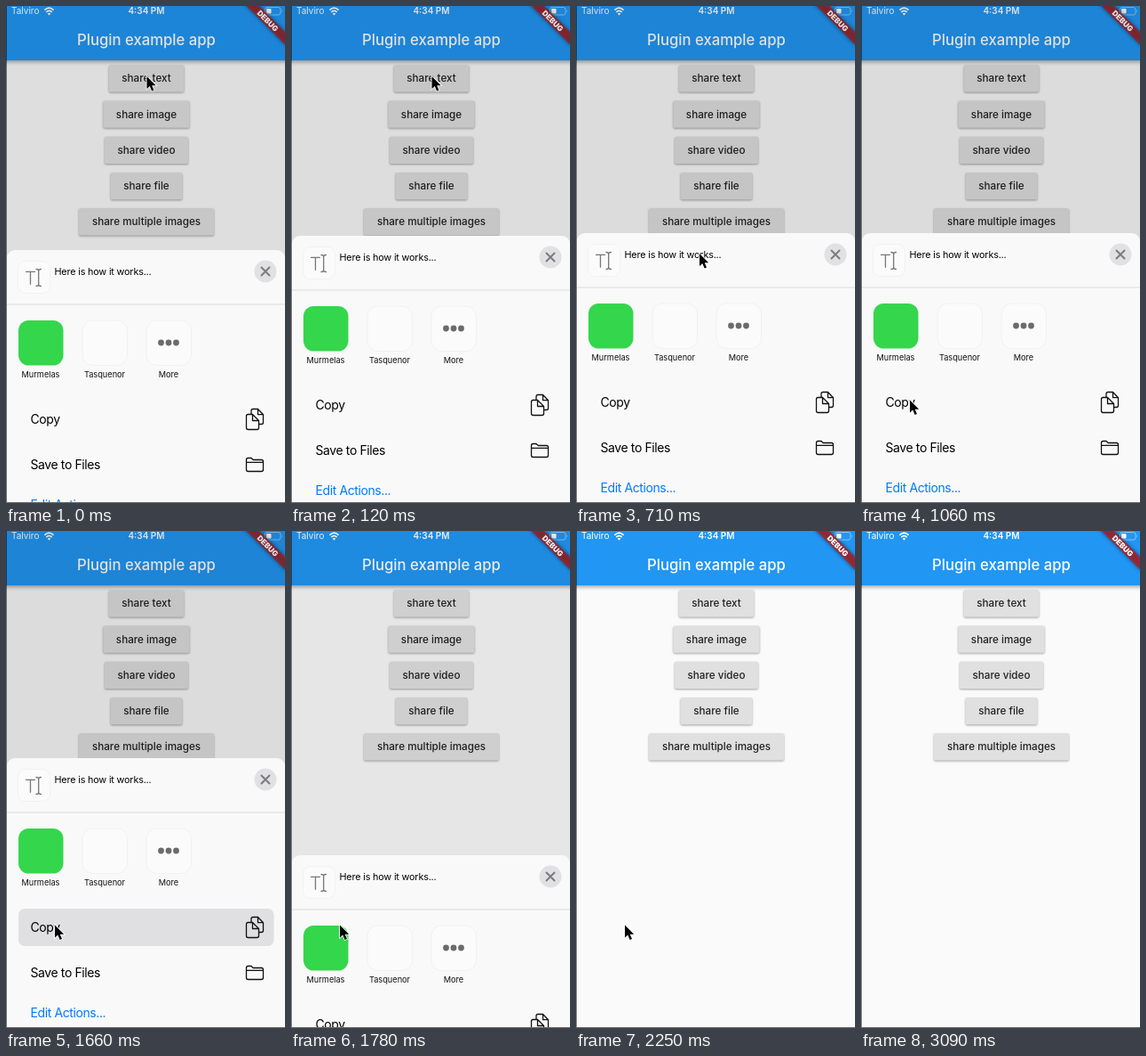
Recreate the animation shown at these times as an HTML page. Size 314 px wide and 558 px high, loop 4.16 s.

```html
<!DOCTYPE html>
<html lang="en">
<head>
<meta charset="utf-8">
<title>Share sheet</title>
<style>
  html, body { margin: 0; width: 100%; height: 100%; overflow: hidden; background: #fafafa; }
  svg { display: block; width: 314px; height: 558px; }
  text { font-family: Inter, "Liberation Sans", sans-serif; }
  .mid { text-anchor: middle; }
  .bar { fill: #2196f3; filter: drop-shadow(0 2px 2px rgba(0, 0, 0, .35)); }
  .status { fill: #fff; font-size: 10px; }
  .title { fill: #fff; font-size: 16.7px; font-weight: 500; }
  .button rect { fill: #e0e0e0; filter: drop-shadow(0 1px 1px rgba(0, 0, 0, .35)); }
  .button text { fill: #212121; font-size: 11.7px; font-weight: 500; }
  .tile { fill: #fbfbfb; stroke: #efefef; stroke-width: .8; }
  .label { font-size: 9.2px; fill: #111; }
  .row { font-size: 14px; letter-spacing: -.4px; }
  .line { fill: none; stroke: #111; stroke-width: 1.3; stroke-linejoin: round; stroke-linecap: round; }
</style>
</head>
<body>
<svg viewBox="0 0 314 558">
  <rect width="314" height="558" fill="#fafafa"/>
  <rect class="bar" x="-6" y="-6" width="326" height="67"/>

  <g class="status">
    <text x="6" y="9.3">Talviro</text>
    <text class="mid" x="158" y="9.3" font-weight="600">4:34 PM</text>
    <path d="M43.4 4.6Q48.5 -.2 53.6 4.6M45.3 6.9Q48.5 3.9 51.7 6.9" fill="none" stroke="#fff" stroke-width="1.7"/>
    <path d="M46.7 8.5Q48.5 6.9 50.3 8.5L48.5 10.4Z"/>
    <rect x="291.5" y="1.5" width="17.5" height="8.5" rx="2.4" fill="none" stroke="#fff" stroke-opacity=".45"/>
    <rect x="293" y="3" width="5.5" height="5.5" rx="1"/>
    <path d="M310.2 4.2q1.6 1.5 0 3z" opacity=".5"/>
  </g>
  <text class="title mid" x="158" y="43.9">Plugin example app</text>
  <g id="buttons"></g>

  <g transform="translate(314 -2.7) rotate(45)">
    <rect x="-34" y="22.4" width="68" height="10.1" opacity=".5" style="filter: blur(2px)"/>
    <rect x="-34" y="22.4" width="68" height="10.1" fill="#b71c1c" fill-opacity=".75"/>
    <text class="mid" y="30.5" fill="#fff" font-size="8.5" font-weight="900">DEBUG</text>
  </g>
  <rect id="dim" width="314" height="558"/>

  <g id="sheet">
    <rect x="1" y="255" width="313" height="330" rx="9" fill="#f9f9f9"/>
    <rect class="tile" x="13.5" y="267.5" width="36" height="36" rx="8"/>
    <path class="line" style="stroke: #777" d="M22.5 279.3H32.5M27.5 279.3V293.3M34 276.5Q36.7 276.5 36.7 278.5Q36.7 276.5 39.4 276.5M36.7 278.5V293.5M34 295.5Q36.7 295.5 36.7 293.5Q36.7 295.5 39.4 295.5"/>
    <text x="54.5" y="283" font-size="10.8" letter-spacing="-.17">Here is how it works...</text>
    <circle cx="292" cy="279" r="12.5" fill="#e1e1e3"/>
    <path class="line" d="M287.5 274.5l9 9m0 -9l-9 9" style="stroke: #7c7c80; stroke-width: 2"/>
    <rect x="1" y="315.5" width="313" height="1" fill="#dcdcdc"/>

    <rect x="14" y="334" width="50.5" height="50.5" rx="11.5" fill="#34d64b"/>
    <rect class="tile" x="86" y="334" width="50.5" height="50.5" rx="11.5"/>
    <rect class="tile" x="158" y="334" width="50.5" height="50.5" rx="11.5"/>
    <g fill="#6b6b6b">
      <circle cx="174.5" cy="359" r="3.4"/>
      <circle cx="183" cy="359" r="3.4"/>
      <circle cx="191.5" cy="359" r="3.4"/>
    </g>
    <g class="label mid">
      <text x="39" y="397.5">Murmelas</text>
      <text x="111" y="397.5">Tasquenor</text>
      <text x="183" y="397.5">More</text>
    </g>

    <rect id="press" x="14" y="424" width="287.5" height="42" rx="7" fill="#e0e0e2"/>
    <g class="row">
      <text x="27.5" y="449.5">Copy</text>
      <text x="27.5" y="501">Save to Files</text>
      <text x="27.5" y="545.8" fill="#007aff">Edit Actions...</text>
    </g>
    <g class="line">
      <path d="M276 439V435.5Q276 433.5 278 433.5H283.5L289.5 439.7V448.5Q289.5 450.5 287.5 450.5H285M283.5 433.5V439.7H289.5"/>
      <path d="M272.5 439.5H277.5L284.5 446.5V454.5Q284.5 456.5 282.5 456.5H272.5Q270.5 456.5 270.5 454.5V441.5Q270.5 439.5 272.5 439.5M277.5 439.5V446.5H284.5"/>
      <path d="M270.5 490.5Q270.5 488.5 272.5 488.5H276L278.2 490.5H287.5Q289.5 490.5 289.5 492.5V501.5Q289.5 503.5 287.5 503.5H272.5Q270.5 503.5 270.5 501.5ZM270.5 493.3H289.5"/>
    </g>
  </g>

  <rect width="1" height="558" fill="#000" fill-opacity=".5"/>
  <rect y="557" width="314" height="1" fill="#6a6a6a"/>
  <path id="cursor" d="M0 0V14L3.3 11L5.6 16.4L8 15.4L5.7 10.2H10.2Z" stroke="#fff" stroke-width="1.6" paint-order="stroke"/>
</svg>
<script>
const LOOP = 4160, TRAVEL = 303;
const OPENED = -243, CLOSED = 1711;
const ticks = [0, 120, 235, 350, 470, 590, 710, 830, 945, 1060, 1660, 1780, 1900, 2010, 2130, 2250, 2970, 3090];
// time, x, y of the pointer tip
const pointer = [
  [0, 158.5, 79], [590, 154, 139], [710, 139, 278], [830, 106, 378],
  [945, 92, 423], [1060, 55, 442.5], [2970, 92, 523], [3090, -50, 0]
];
const labels = [["text", 84.5], ["image", 97], ["video", 94], ["file", 80.5], ["multiple images", 152]];
const $ = id => document.getElementById(id);

$("buttons").innerHTML = labels.map(([name, w], i) => `
  <g class="button" transform="translate(158 ${66.2 + 40.25 * i})">
    <rect x="${-w / 2}" width="${w}" height="30.2" rx="1.7"/>
    <text class="mid" y="19.2">share ${name}</text>
  </g>`).join("");

// Distance left of a critically damped spring, from 1 to 0
function spring(ms) {
  const x = Math.max(0, ms) * 0.0183;
  return (1 + x) * Math.exp(-x);
}

function draw(now) {
  const time = now % LOOP;
  const t = ticks.findLast(tick => tick <= time);
  const shown = t < CLOSED ? 1 - spring(t - OPENED) : spring(t - CLOSED);
  const [, x, y] = pointer.findLast(p => p[0] <= t);
  $("sheet").setAttribute("transform", `translate(0 ${TRAVEL - Math.round(TRAVEL * shown)})`);
  $("sheet").style.display = t < 2250 ? "" : "none";
  $("dim").setAttribute("opacity", 0.12 * shown);
  $("press").style.display = t === 1660 ? "" : "none";
  $("cursor").setAttribute("transform", `translate(${x} ${y})`);
}

const start = performance.now();
function loop() {
  draw(performance.now() - start);
  requestAnimationFrame(loop);
}
loop();
</script>
</body>
</html>
```
